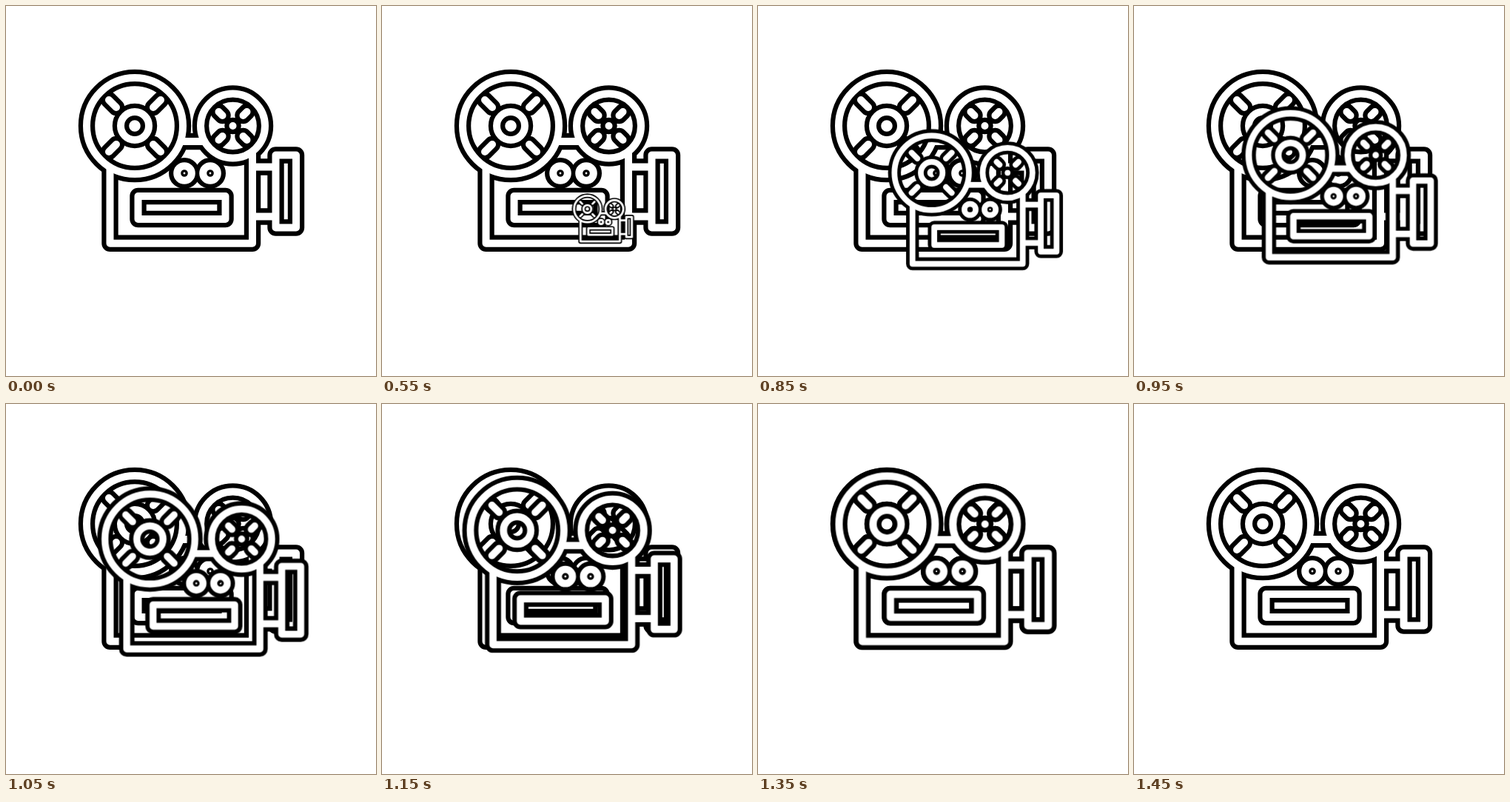
An HTML page for the animation above (1470 ms loop, 500 px wide and 500 px high).

```html
<!DOCTYPE html>
<html lang="en">
<head>
<meta charset="utf-8">
<title>Film camera</title>
<style>
  html, body { margin: 0; width: 100%; height: 100%; overflow: hidden; background: #fff; }
  svg { display: block; width: 100vw; height: 100vh; }
  .lines { fill: none; stroke-linejoin: round; }
  .edge { stroke: #000; stroke-width: 22.4px; }
  .core { stroke: #fff; stroke-width: 10px; }
  .round { stroke-linecap: round; }

  /* The copy swings up and grows in 100 ms steps until it covers the camera. */
  .copy {
    transform-origin: 250px 208px;
    animation: grow 1470ms step-end infinite;
  }
  @keyframes grow {
    0%      { visibility: hidden;  transform: none; }
    37.415% { visibility: visible; transform: translate(48.5px, 79px) scale(.276); }
    44.218% { visibility: visible; transform: translate(57px, 79.5px) scale(.475); }
    51.02%  { visibility: visible; transform: translate(56px, 70.5px) scale(.651); }
    57.823% { visibility: visible; transform: translate(43.5px, 53px) scale(.774); }
    64.626% { visibility: visible; transform: translate(27.5px, 33.5px) scale(.869); }
    71.429% { visibility: visible; transform: translate(15.5px, 17.5px) scale(.935); }
    78.231% { visibility: visible; transform: translate(6.5px, 7.5px) scale(.973); }
    85.034% { visibility: visible; transform: translate(1.5px, 1.7px) scale(.992); }
    91.837% { visibility: visible; transform: translate(.3px, .3px) scale(.999); }
    98.639%, 100% { visibility: hidden; transform: none; }
  }
</style>
</head>
<body>
<svg viewBox="0 0 500 500">
  <defs>
    <g id="lines" class="lines">
      <!-- body -->
      <path d="M140.5 217V320.800H333V196M235.5 183H268"/>
      <rect x="178.5" y="257" width="118" height="31"/>
      <circle cx="241" cy="226" r="9.800"/>
      <circle cx="276" cy="226" r="9.800"/>
      <!-- lens -->
      <path d="M333 217.5H365M333 284.5H365"/>
      <rect x="364.5" y="201.5" width="27.5" height="98"/>
      <!-- large reel -->
      <g transform="translate(174 162)">
        <circle r="65"/>
        <circle r="19"/>
        <path class="round" d="M-35-35L-25-25M35-35L25-25M-35 35L-25 25M35 35L25 25"/>
      </g>
      <!-- small reel -->
      <g transform="translate(306.5 162)">
        <circle r="43.5"/>
        <path class="round" d="M0 0h.01M-19-19L-14-14M19-19L14-14M-19 19L-14 14M19 19L14 14"/>
      </g>
    </g>
    <g id="camera">
      <use href="#lines" class="edge"/>
      <use href="#lines" class="core"/>
    </g>
  </defs>
  <use href="#camera"/>
  <g class="copy"><use href="#camera"/></g>
</svg>
</body>
</html>
```
